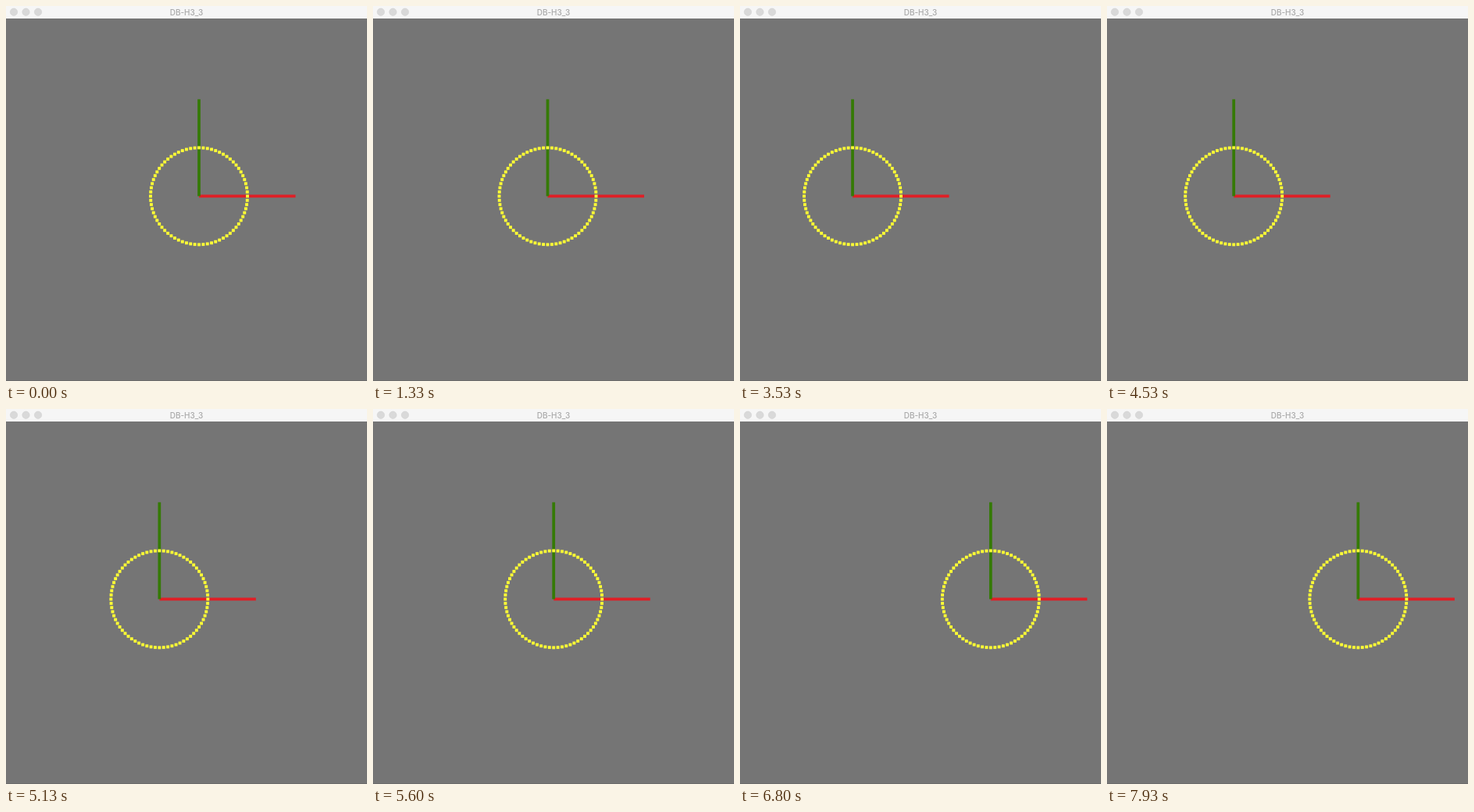
Animation, 462 px wide and 480 px high, one loop 8 s. Source, as an HTML page:

```html
<!DOCTYPE html>
<html lang="en">
<head>
<meta charset="utf-8">
<title>Axes and circle</title>
<style>
  html, body { margin: 0; width: 100%; height: 100%; overflow: hidden; background: #757575; }
  svg { display: block; width: 100%; height: 100%; }
  text { font: 500 10px Inter, "Open Sans", sans-serif; fill: #a9a9a9; }
</style>
</head>
<body>
<svg viewBox="0 0 462 480">
  <rect width="462" height="480" fill="#757575"/>
  <rect y="479" width="462" height="1" fill="#6b6b6b"/>
  <g id="scene">
    <path d="M0 0H123.5" stroke="#df1f26" stroke-width="3.75"/>
    <path d="M0 0V-124" stroke="#357a05" stroke-width="3.75"/>
    <g id="dots" fill="#ffff35"></g>
  </g>
  <rect width="462" height="16" fill="#f6f6f6"/>
  <g fill="#d9d9d9" stroke="#cdcdcd" stroke-width=".5">
    <circle cx="10" cy="7.7" r="4.7"/>
    <circle cx="25.5" cy="7.7" r="4.7"/>
    <circle cx="41" cy="7.7" r="4.7"/>
  </g>
  <text x="231" y="11.5" text-anchor="middle">DB-H3_3</text>
</svg>
<script>
const LOOP = 8000;
const TICK = 1000 / 15;
const RADIUS = 62;
const DOTS = 72;
const SIZE = 3.9;
const START_X = 247;
const CENTER_Y = 243.4;

// Arrow keys being held: first and last tick, pixels per tick
const holds = [
  { from: 11, to: 20, speed: -2.61 },
  { from: 21, to: 36, speed: -2.47 },
  { from: 37, to: 54, speed: -2.65 },
  { from: 59, to: 72, speed: 2.31 },
  { from: 72, to: 105, speed: 4.98 },
  { from: 116, to: 119, speed: -4.8 }
];

const scene = document.getElementById("scene");
const dots = document.getElementById("dots");

for (let i = 0; i < DOTS; i++) {
  const angle = i / DOTS * 2 * Math.PI;
  const dot = document.createElementNS("http://www.w3.org/2000/svg", "rect");
  dot.setAttribute("x", (RADIUS * Math.cos(angle) - SIZE / 2).toFixed(2));
  dot.setAttribute("y", (RADIUS * Math.sin(angle) - SIZE / 2).toFixed(2));
  dot.setAttribute("width", SIZE);
  dot.setAttribute("height", SIZE);
  dots.append(dot);
}

const clamp = (value, low, high) => Math.min(high, Math.max(low, value));

function originAt(tick) {
  return holds.reduce(
    (x, { from, to, speed }) => x + speed * (clamp(tick, from, to) - from),
    START_X
  );
}

function draw(ms) {
  const tick = Math.floor((ms % LOOP + 5) / TICK) % (LOOP / TICK);
  scene.setAttribute("transform", `translate(${originAt(tick).toFixed(2)} ${CENTER_Y})`);
}

const start = performance.now();
function loop() {
  draw(performance.now() - start);
  requestAnimationFrame(loop);
}
loop();
</script>
</body>
</html>
```
